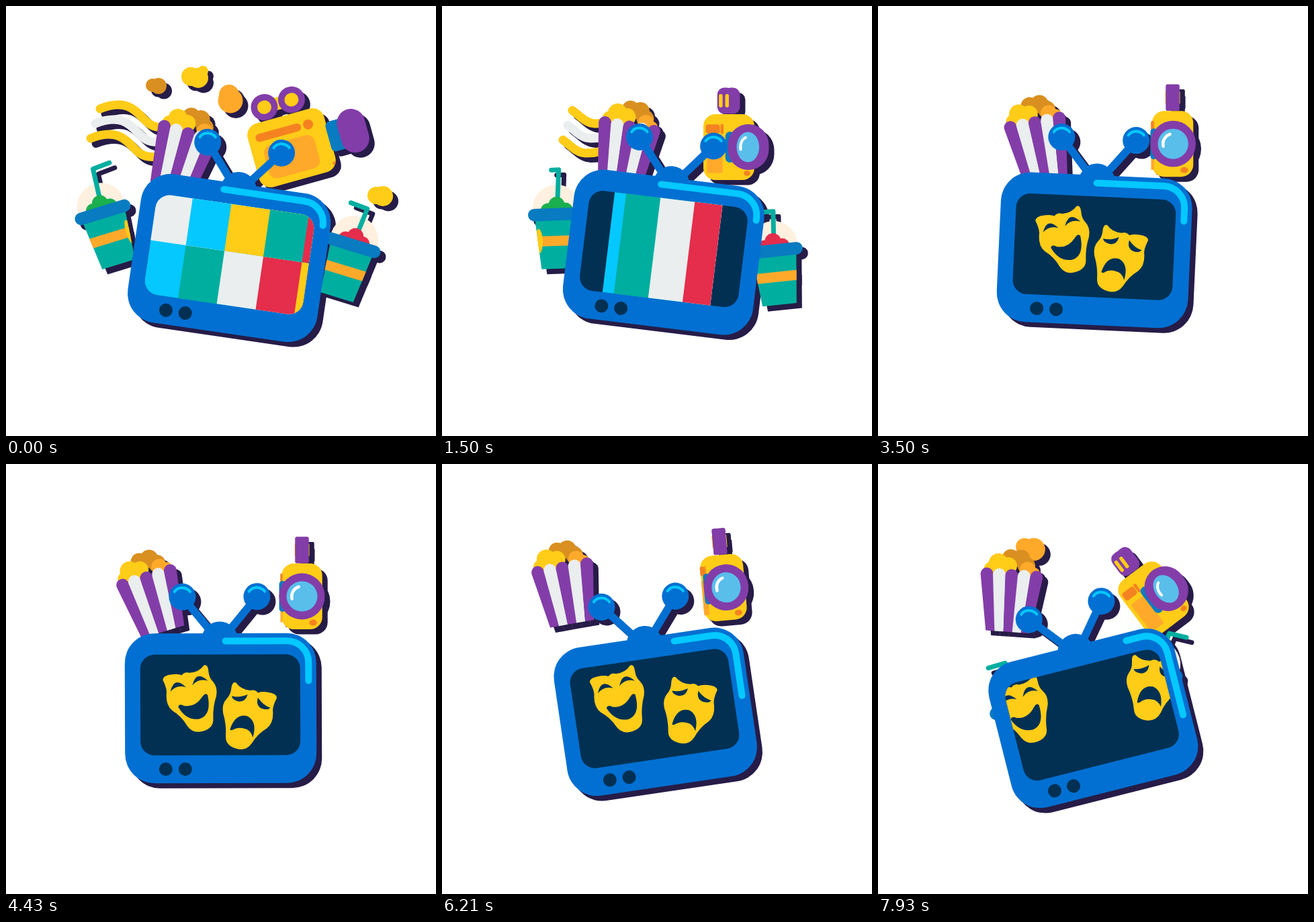
An HTML page with a canvas that plays this animation: 640 px wide and 640 px high, repeating every 8 s.

```html
<!DOCTYPE html>
<html lang="en">
<head>
<meta charset="utf-8">
<title>Entertainment</title>
<style>
  html, body { margin: 0; height: 100%; overflow: hidden; background: #fff; }
  canvas { display: block; width: 100vmin; height: 100vmin; }
</style>
</head>
<body>
<canvas id="stage" width="640" height="640"></canvas>
<script>
const ctx = document.getElementById('stage').getContext('2d');
const LOOP = 8000, STEP = 1000 / 14, TAU = Math.PI * 2;
const C = {
  shadow: '#261c47', blue: '#0270d2', navy: '#013053', cyan: '#04c8ff', yellow: '#ffcc18',
  white: '#eaeeee', teal: '#00ae9f', red: '#e52d4c', purple: '#833da9', orange: '#ffa92b',
  rust: '#f58220', brown: '#d99020', lid: '#087bc1', cream: '#fff0df', green: '#1aaf4f', glass: '#59beea'
};
const POSES = [0, 860, 1500, 2570, 4430, 6210, 7930];
let now = 0, shadowPass = false;

// Monotone cubic interpolation through keyed values.
function track(times, values) {
  const n = times.length - 1;
  if (now <= times[0]) return values[0];
  if (now >= times[n]) return values[n];
  let i = 0;
  while (now >= times[i + 1]) i++;
  const slope = k => (values[k + 1] - values[k]) / (times[k + 1] - times[k]);
  const tangent = k => {
    if (k === 0) return slope(0);
    if (k === n) return slope(n - 1);
    const a = slope(k - 1), b = slope(k);
    return a * b <= 0 ? 0 : 2 * a * b / (a + b);
  };
  const h = times[i + 1] - times[i], u = (now - times[i]) / h, v = 1 - u;
  return values[i] * (1 + 2 * u) * v * v + tangent(i) * h * u * v * v
    + values[i + 1] * u * u * (3 - 2 * u) - tangent(i + 1) * h * u * u * v;
}
const pose = (...values) => track(POSES, values);

// Drawing helpers; in the shadow pass every colour becomes the shadow colour.
const ink = color => shadowPass ? C.shadow : color;

function at(x, y, degrees, draw) {
  ctx.save();
  ctx.translate(x, y);
  ctx.rotate(degrees * Math.PI / 180);
  draw();
  ctx.restore();
}
function fill(color, path) {
  ctx.fillStyle = ink(color);
  if (path) ctx.fill(path); else ctx.fill();
}
function ellipse(color, x, y, rx, ry = rx) {
  ctx.beginPath();
  ctx.ellipse(x, y, Math.max(0, rx), ry, 0, 0, TAU);
  fill(color);
}
function box(color, cx, cy, w, h, r = 0) {
  ctx.beginPath();
  ctx.roundRect(cx - w / 2, cy - h / 2, w, h, Math.min(r, w / 2, h / 2));
  fill(color);
}
function polygon(color, points) {
  ctx.beginPath();
  points.forEach(p => ctx.lineTo(...p));
  fill(color);
}
function stroke(color, width, path) {
  ctx.strokeStyle = ink(color);
  ctx.lineWidth = width;
  ctx.lineCap = ctx.lineJoin = 'round';
  if (path) ctx.stroke(path); else ctx.stroke();
}
function line(color, width, points) {
  ctx.beginPath();
  points.forEach(p => ctx.lineTo(...p));
  stroke(color, width);
}
function kernel(color, x, y, scale, lobes) {
  if (scale <= 0) return;
  for (const [dx, dy, r] of lobes) ellipse(color, x + dx * scale, y + dy * scale, r * scale);
}

function drawFlyingPopcorn() {
  const fade = 1 - now / 500;
  kernel(C.brown, 225, 120, fade, [[-7, -2, 10], [2, -1, 12]]);
  kernel(C.yellow, 282, 105, fade, [[-7, 0, 14], [4, 2, 15], [11, -8, 8]]);
  kernel(C.orange, 334, 138, fade, [[0, 3, 18.5], [-2, -6, 15]]);
  kernel(C.yellow, 558, 283, fade, [[-7, -1, 13], [3, 0, 15]]);
  const pop = track([7640, 7930], [0, 1]);
  kernel(C.orange, 222 + 5 * pop, 152 - 27 * pop, pop, [[5, 2, 17], [-9, -2, 13]]);
}

const ribbon = new Path2D('M0 0C55-28 60 18 88 18S112 10 125 8');
function drawRibbons() {
  const trim = track([860, 1500, 2000], [0, 57, 150]);
  if (trim >= 140) return;
  const x = pose(140, 128, 140, 150, 150, 150, 150);
  const y = pose(153, 154, 157, 157, 157, 157, 157);
  const tilt = pose(6, 0, 0, 0, 0, 0, 0);
  [C.yellow, C.white, C.yellow].forEach((color, i) => at(x - 7 * i, y + 22 * i, tilt, () => {
    ctx.setLineDash([300, 999]);
    ctx.lineDashOffset = -trim;
    stroke(color, 13, ribbon);
  }));
}

function drawPopcornBox() {
  const x = pose(271, 282, 279, 258.5, 209, 179, 199);
  const y = pose(190, 162, 180, 177, 169.5, 155, 166);
  at(x, y, pose(17, 13, 10, -0.5, -17, -10, 4), () => {
    kernel(C.brown, 0, 0, 1, [[-3, -26, 13], [12, -26, 13.5], [21, -16, 13]]);
    kernel(C.orange, 0, 0, 1, [[23, -10, 12], [33, -5, 9]]);
    kernel(C.yellow, 0, 0, 1, [[-21, -17, 14.5], [-6, -14, 13], [-32, -8, 10]]);
    for (let i = 0; i < 5; i++) {
      const left = -33 + 13.2 * i;
      ctx.beginPath();
      ctx.arc(-37 + 18.5 * i, 0, 9.5, Math.PI, 0);
      ctx.lineTo(left + 13.4, 84);
      ctx.lineTo(left, 84);
      fill(i % 2 ? C.white : C.purple);
    }
  });
}

function drawCamera() {
  const x = pose(425, 423.5, 427, 434.5, 440.5, 419, 410);
  const y = pose(211, 209, 210, 210, 197, 184, 200);
  const side = pose(1, 0.65, 0.3, 0.1, 0.04, 0.1, 0.3);
  const lensX = pose(95, 70, 29, 2.5, 0, 4, 24);
  at(x, y, pose(-15.5, -1, 0, 0, 0, -5, -37), () => {
    const turn = Math.max(0, (side - 0.1) / 0.9);

    box(C.yellow, 0, -69, 22, 19, 1);
    const reels = [-21, 21].map(d => d * turn - 2 * turn);
    for (const rx of reels) box(C.purple, rx, -69, 20 + 20 * turn, 39, 2 + 18 * Math.sqrt(turn));
    if (turn > 0.03) for (const rx of reels)
      box(C.yellow, rx - 9 * (1 - turn), -69, 20 * turn + 1, 20, 10);

    box(C.yellow, 0, 0, 58 + 60 * side, 98, 18);
    const face = -32 * (1 - side) ** 1.3;
    box(C.rust, face - 13 * side, -27, 70 * side, 14 - 2 * side, 7 * Math.sqrt(side));
    box(C.rust, face + 33 * side, -27, 15 * side, 15, 7.5);
    box(C.orange, face - 3 * side, 13, 78 * side, 51, 12 * side * side);
    ellipse(C.rust, 15 + 40 * side, 39, 6 - 4 * side, 4.5 - 2 * side);

    const lensW = 69 - 27 * side, neck = 17 * turn + 10;
    box(C.lid, lensX - lensW / 2 + 10 - neck / 2, 0, neck, 46, 7);
    box(C.purple, lensX, 0, lensW, 69 - 3 * side, lensW / 2);
    if (shadowPass || side > 0.97) return;
    const glassX = lensX - 3 * turn, glassW = 24 * (1 - side);
    ellipse(C.glass, glassX, 0, glassW, 22.5);
    ctx.beginPath();
    ctx.ellipse(glassX, 0, glassW * 0.66, 15, 0, 2.9, 4.4);
    stroke('#fff', 4.5 - 2.5 * turn);
  });
}

function drawCup(x, y, tilt, fruit, strawTop, strawTip, badge) {
  at(x, y, tilt, () => {
    if (!shadowPass) ellipse(C.cream, 0, -8, 36);
    line(C.teal, 7, [[1, -12], [5, strawTop], [5 + strawTip, strawTop + 1 - Math.abs(strawTip) / 10]]);
    kernel(fruit, 0, 0, 1, [[0, -14, 12], [-13, -6, 11], [13, -6, 11]]);
    polygon(C.teal, [[-33, 5], [33, 5], [25.5, 81], [-25.5, 81]]);
    polygon(C.orange, [[-30.5, 32], [30.5, 32], [29, 47], [-29, 47]]);
    if (badge !== undefined && !shadowPass) {
      ctx.save();
      ctx.beginPath();
      ctx.moveTo(-33, 5);
      ctx.lineTo(33, 5);
      ctx.lineTo(25.5, 81);
      ctx.lineTo(-25.5, 81);
      ctx.clip();
      ellipse(C.yellow, badge, 39, 13 * Math.sqrt(1 - (badge / 31) ** 2), 18);
      ctx.restore();
    }
    box(C.lid, 0, 0, 86, 18.5, 9.25);
  });
}
function drawCups() {
  const times = [0, 860, 1500, 1750, 2100, 7450, 7930];
  const key = (...values) => track(times, values);
  drawCup(key(144, 125, 171, 192, 250, 255, 207), key(307, 309, 310, 324, 350, 365, 360),
    key(-17, -14, -2, 0, 0, -10, -20), C.green, -66,
    key(26, 14, -11, -18, -20, -26, -26), key(29, -9, -28, -30, -30, -30, -30));
  drawCup(key(516, 541.5, 494, 471, 400, 380, 412), key(356, 355, 364, 365, 365, 340, 306),
    key(17, 1.5, -6, -6, -6, 10, 17), C.red, -58,
    key(-26, -21, -20, -15, 0, 20, 26));
}

function drawBars() {
  const wide = [-125, -66.6, -8.5, 50, 108, 166];
  const narrow = [-83, -66, -14.5, 37, 78.5, 78.5];
  const edges = wide.map((w, i) => track([1240, 1500, 1850], [w, narrow[i], -14]));
  const split = track([0, 860, 1300], [-9.5, 33.5, -82]);
  const row = (colors, top, bottom) => colors.forEach((color, i) => {
    ctx.fillStyle = color;
    ctx.fillRect(edges[i], top, edges[5] - edges[i], bottom - top);
  });
  row([C.cyan, C.teal, C.white, C.red, C.yellow], -82, 72);
  row([C.white, C.cyan, C.yellow, C.teal, C.red], -82, split);
}

const face = new Path2D('M-35-40Q-33-46-20-44Q-11-43-6-39Q0-43 6-39Q20-36 30-44Q36-44 34-34Q32-24 36-17Q41-7 35 5Q25 20 21 37Q18 50 1 50Q-14 50-19 36Q-23 20-34 8Q-41-2-36-17Q-32-24-35-40Z');
const smile = new Path2D('M-29-20Q-17-41-5-20Q-17-28-29-20ZM5-20Q17-41 29-20Q17-28 5-20ZM-24 5Q-21 0-15 6Q0 13 14 1Q21-5 23 0Q21 30 2 31Q-18 29-24 5Z');
const frown = new Path2D('M-30-23Q-19-23-8-32Q-8-19-19-18Q-28-18-30-23ZM30-23Q19-23 8-32Q8-19 19-18Q28-18 30-23ZM-18 25Q-17-1 2-1Q18 3 18 27Q12 17 2 18Q-8 18-14 25Q-17 27-18 25Z');
function drawMasks() {
  const times = [2150, 2570, 3400, 4430, 6210, 7100, 7930];
  const key = (...values) => track(times, values);
  at(key(150, 244, 279, 278, 266, 262, 218), key(340, 341, 348, 350, 351, 355, 367),
    key(4, 3.5, -16, -16, -19, -21, -21), () => {
      fill(C.yellow, face);
      fill(C.navy, smile);
    });
  at(key(510, 403, 357, 358, 366, 372, 407), key(392, 386, 377, 376, 367, 360, 332),
    key(4, 4, 17, 17, 14, 11, 8), () => {
      ctx.save();
      ctx.scale(-1, 1);
      fill(C.yellow, face);
      ctx.restore();
      fill(C.navy, frown);
    });
}

function drawTelevision() {
  const x = pose(332.2, 331.5, 329.8, 325.8, 319.5, 317.7, 320.3);
  const y = pose(375.1, 369.4, 366.6, 363.4, 363.5, 368.8, 378.5);
  const tilt = pose(8.3, 7.8, 7, 4.9, -0.2, -8.4, -14.2);
  at(x, y, tilt, () => {
    for (const side of [-1, 1]) line(C.blue, 11.5, [[-1 + side * 8, -108], [-1 + side * 55.5, -166]]);
    ellipse(C.blue, -1, -102, 27);
    box(C.blue, 0, 0, 285, 223, 44);
    for (const bx of [-56.5, 54.5]) {
      ellipse(C.blue, bx, -166, 20);
      if (shadowPass) continue;
      // The glint stays on top whatever the tilt.
      at(bx, -166, -tilt, () => {
        ctx.beginPath();
        ctx.arc(0, 1, 14.5, -2.5, -0.64);
        stroke(C.cyan, 4);
      });
    }
    if (shadowPass) return;

    const shine = pose(-22.6, -19.2, -16, -7.9, 7.5, 43, 76);
    ctx.beginPath();
    ctx.moveTo(shine, -100);
    ctx.lineTo(99, -100);
    ctx.arcTo(131, -100, 131, -68, 32);
    ctx.lineTo(131, shine - 48);
    stroke(C.cyan, 10);
    ellipse(C.navy, -82, 90.5, 10);
    ellipse(C.navy, -53, 90.5, 10);

    box(C.navy, -0.5, -5, 238, 150, 21);
    ctx.clip();
    if (now < 1850) drawBars();
    ctx.setTransform(1, 0, 0, 1, 0, 0);
    drawMasks();
  });
}

function drawScene() {
  drawFlyingPopcorn();
  drawRibbons();
  drawPopcornBox();
  drawCamera();
  drawCups();
  drawTelevision();
}

const start = performance.now();
function frame() {
  const elapsed = (performance.now() - start) % LOOP;
  now = Math.floor((elapsed + 5) / STEP) * STEP % LOOP;
  ctx.setTransform(1, 0, 0, 1, 0, 0);
  ctx.fillStyle = '#fff';
  ctx.fillRect(0, 0, 640, 640);
  shadowPass = true;
  ctx.setTransform(1, 0, 0, 1, 8, 7.5);
  drawScene();
  shadowPass = false;
  ctx.setTransform(1, 0, 0, 1, 0, 0);
  drawScene();
  requestAnimationFrame(frame);
}
frame();
</script>
</body>
</html>
```
